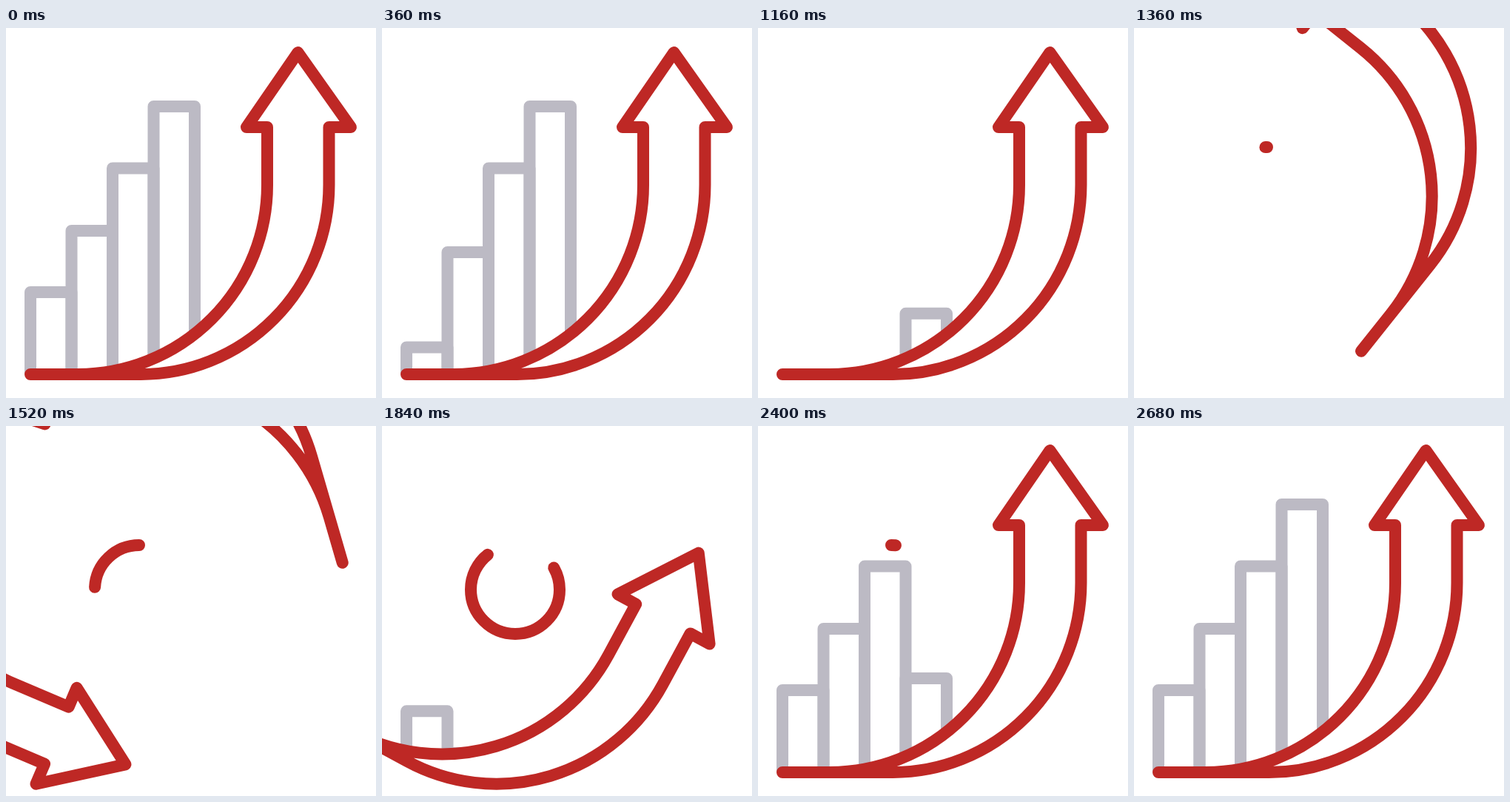
Write an HTML page that moves like this. It is 500 by 500 pixels and loops after 3.16 s.

```html
<!DOCTYPE html>
<html lang="en">
<head>
<meta charset="utf-8">
<title>Growth chart</title>
<style>
  html, body { margin: 0; width: 100%; height: 100%; overflow: hidden; background: #fff; }
  svg { display: block; width: 100%; height: 100%; }
  path { fill: none; stroke-width: 16; stroke-linejoin: round; }
  .bar { stroke: #bcbac4; }
  .red { stroke: #be2825; stroke-linecap: round; }
  .cover { fill: #fff; stroke: none; }
</style>
</head>
<body>
<svg viewBox="0 0 500 500">
  <defs>
    <path id="arrow" class="red" d="M33 468H97A256 256 0 0 0 353 212V134H325L394.5 33L466 134H436.500V212A254 256 0 0 1 182 468Z"/>
    <path id="cover" class="cover" d="M33 468H97A256 256 0 0 0 353 212V134H700V700H33Z"/>
  </defs>
  <path class="bar"/><path class="bar"/><path class="bar"/><path class="bar"/>
  <use href="#cover" class="leaving"/>
  <use href="#cover" class="arriving"/>
  <use href="#arrow" class="leaving"/>
  <use href="#arrow" class="arriving"/>
  <path id="ring" class="red" pathLength="1" d="M180 161A60 60 0 0 0 180 281A60 60 0 0 0 180 161"/>
</svg>
<script>
const LOOP = 3160, STEP = 40, BASE = 468, BAR_WIDTH = 55.5;
const tops = [357, 274, 189.5, 106];
const riseStarts = [1557, 1767, 2002, 2250];
const bars = document.querySelectorAll('.bar');
const ring = document.getElementById('ring');

// cubic-bezier(.167, 0, .833, 1)
function ease(x) {
  if (x <= 0) return 0;
  if (x >= 1) return 1;
  let low = 0, high = 1;
  for (let i = 0; i < 24; i++) {
    const s = (low + high) / 2;
    const px = 3 * (1 - s) * s * ((1 - s) * 0.167 + s * 0.833) + s ** 3;
    if (px < x) low = s; else high = s;
  }
  return low * low * (3 - 2 * low);
}

const tween = (t, start, duration) => ease((t - start) / duration);

function show(el, visible) {
  el.style.display = visible ? '' : 'none';
}

function turn(name, angle) {
  for (const el of document.querySelectorAll('.' + name)) {
    show(el, Math.abs(angle) < 180);
    el.setAttribute('transform', `rotate(${angle} 137.5 168)`);
  }
}

function render(t) {
  bars.forEach((bar, i) => {
    const size = 1 - tween(t, i * 250, 560) + tween(t, riseStarts[i], 400);
    const x = 33 + i * BAR_WIDTH;
    const y = BASE - (BASE - tops[i]) * size;
    show(bar, size > 0.001);
    bar.setAttribute('d', `M${x} ${BASE}V${y}H${x + BAR_WIDTH}V${BASE}`);
  });

  turn('leaving', -180 * tween(t, 1160, 626));
  turn('arriving', 180 * (1 - tween(t, 1207, 796)));

  const tail = tween(t, 1732, 700), length = tween(t, 1342, 634) - tail;
  show(ring, length > 0.001);
  ring.style.strokeDasharray = `${length} 2`;
  ring.style.strokeDashoffset = -tail;
}

function frame() {
  render(Math.floor(performance.now() % LOOP / STEP) * STEP);
  requestAnimationFrame(frame);
}
frame();
</script>
</body>
</html>
```
